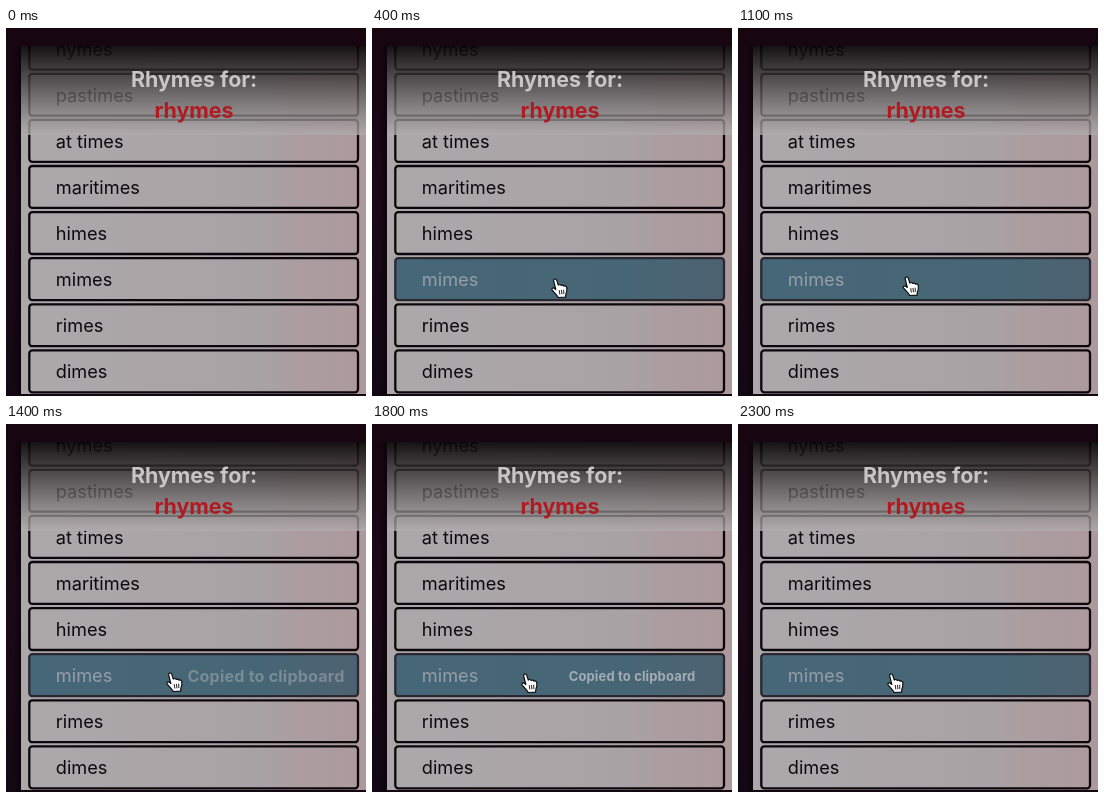
Animation of 360x368 px, one loop 2400 ms. Source, as an HTML page:

```html
<!DOCTYPE html>
<html lang="en">
<head>
<meta charset="utf-8">
<title>Rhymes</title>
<style>
  html, body { margin: 0; width: 100%; height: 100%; overflow: hidden; background: #170611; }
  svg { display: block; width: 100vw; height: 100vh; }
  text { font-family: Inter, Roboto, "Liberation Sans", sans-serif; }
  .row rect { fill: none; stroke: #0c070a; stroke-width: 2.3; }
  .row text { font-size: 18.2px; fill: #0d090c; }
  .row.hover rect { fill: url(#hover); stroke: #29282e; }
  .row.hover text { fill: #969ea7; }
  .title { font-size: 21.4px; font-weight: 700; text-anchor: middle; }
  #note { font-size: 13px; font-weight: 700; letter-spacing: .15px; text-anchor: middle; fill: #bcc0c6; }
</style>
</head>
<body>
<svg viewBox="0 0 360 368">
  <defs>
    <linearGradient id="back" x2="0" y2="1">
      <stop offset="0" stop-color="#170610"/>
      <stop offset=".5" stop-color="#1b0917"/>
      <stop offset="1" stop-color="#120812"/>
    </linearGradient>
    <linearGradient id="edge">
      <stop offset="0" stop-color="#0a0308" stop-opacity="0"/>
      <stop offset="1" stop-color="#0a0308" stop-opacity=".8"/>
    </linearGradient>
    <linearGradient id="panel">
      <stop offset="0" stop-color="#aca8aa"/>
      <stop offset=".7" stop-color="#a9a2a5"/>
      <stop offset=".8" stop-color="#ab9da0"/>
      <stop offset="1" stop-color="#ad999c"/>
    </linearGradient>
    <linearGradient id="hover">
      <stop offset="0" stop-color="#466779"/>
      <stop offset=".7" stop-color="#476675"/>
      <stop offset="1" stop-color="#4d6271"/>
    </linearGradient>
    <linearGradient id="shade" x2="0" y2="1">
      <stop offset="0" stop-color="#040103" stop-opacity=".9"/>
      <stop offset=".35" stop-color="#383435" stop-opacity=".8"/>
      <stop offset=".7" stop-color="#7c7879" stop-opacity=".77"/>
      <stop offset="1" stop-color="#b2acae" stop-opacity=".77"/>
    </linearGradient>
    <clipPath id="view"><rect x="15" y="18" width="345" height="348"/></clipPath>
  </defs>

  <rect width="360" height="368" fill="url(#back)"/>
  <rect x="7" y="18" width="8" height="350" fill="url(#edge)"/>
  <g clip-path="url(#view)">
    <rect x="15" y="18" width="345" height="348" fill="url(#panel)"/>
    <g id="list"></g>
    <rect x="15" y="18" width="345" height="89" fill="url(#shade)"/>
  </g>
  <text class="title" x="188" y="59" fill="#c8c5c7">Rhymes for:</text>
  <text class="title" x="188" y="90" fill="#b01b21">rhymes</text>
  <text id="note" y="4.7">Copied to clipboard</text>
  <g id="hand" stroke="#0b0b0d" stroke-width="1.2" stroke-linejoin="round" stroke-linecap="round">
    <path fill="#fff" d="M2.6 2.2C2.4 .4 5 -.2 5.7 1.6L7.3 6.6C8.2 5.6 9.8 5.9 10.2 7
      C11.2 6.2 12.6 6.6 13 7.7C14.2 7.1 15.6 7.7 15.8 9.2C16.2 12 15.8 14 14.8 16
      L14.6 18.6L7.2 19C6.4 16.6 3.6 14.6 1.2 11.6C.2 10 1.8 8.8 3.2 9.8L4.8 11Z"/>
    <path fill="none" stroke-width=".9" d="M8.3 12l.5 3.6M10.5 11.8l.4 3.6M12.7 11.6l.1 3.6"/>
  </g>
</svg>
<script>
const LOOP = 2400, STEP = 100;
const PITCH = 46.1, TOP = -0.3;
const words = ["hymes", "pastimes", "at times", "maritimes", "himes", "mimes", "rimes", "dimes"];

// time, x, y
const path = [
  [100, 104, 343], [200, 133, 300], [300, 168, 263], [400, 179, 250.5],
  [800, 169, 248.5], [1400, 160, 248.5], [1800, 149, 249.5], [2400, 149, 249.5]
];
// time, scale, opacity
const fade = [
  [1200, 1.5, 0], [1300, 1.37, .15], [1400, 1.24, .42], [1600, 1.06, .7],
  [1800, 1, .78], [2000, 1, .6], [2300, 1, 0], [2400, 1, 0]
];

const byId = id => document.getElementById(id);
const hand = byId("hand"), note = byId("note"), list = byId("list");
const rowTop = i => TOP + i * PITCH;

list.innerHTML = words.map((word, i) => `<g class="row">
  <rect x="23.3" y="${rowTop(i)}" width="328.7" height="41.9" rx="3"/>
  <text x="49.8" y="${rowTop(i) + 28}">${word}</text></g>`).join("");
const rows = [...list.children];

function sample(keys, t) {
  const n = keys.findIndex(key => key[0] > t);
  if (n < 1) return null;
  const a = keys[n - 1], b = keys[n];
  const k = (t - a[0]) / (b[0] - a[0]);
  return a.slice(1).map((v, i) => v + (b[i + 1] - v) * k);
}

function draw(now) {
  const t = Math.floor((now % LOOP) / STEP) * STEP;
  const spot = sample(path, t), pop = sample(fade, t);

  hand.style.display = spot ? "" : "none";
  if (spot) hand.setAttribute("transform", `translate(${spot})`);
  const active = spot ? Math.floor((spot[1] + 1 - TOP) / PITCH) : -1;
  rows.forEach((row, i) => row.classList.toggle("hover", i === active));

  note.style.opacity = pop ? pop[1] : 0;
  note.setAttribute("transform", `translate(260 252) scale(${pop ? pop[0] : 1})`);
}

const start = performance.now();
function tick() {
  draw(performance.now() - start);
  requestAnimationFrame(tick);
}
tick();
</script>
</body>
</html>
```
